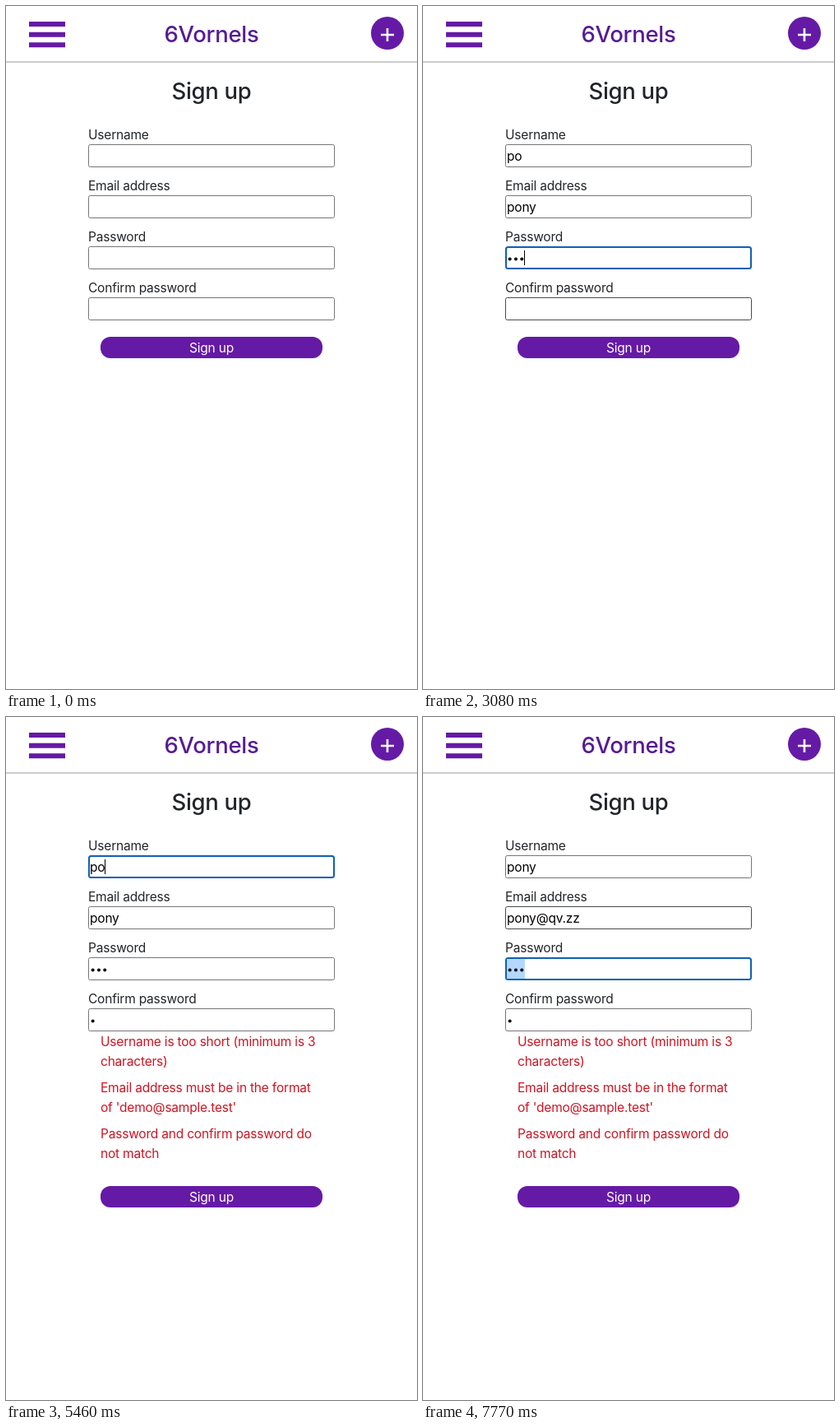
An HTML page for the animation above (8000 ms loop, 500x830 px).

```html
<!DOCTYPE html>
<html lang="en">
<head>
<meta charset="utf-8">
<title>Sign up</title>
<style>
  html, body { margin: 0; width: 100%; height: 100%; overflow: hidden; background: #fff; }
  svg { display: block; }
  text { font: 15.5px Inter, "Open Sans", sans-serif; letter-spacing: -0.2px; fill: #212529; }
  .heading { font-size: 27.5px; font-weight: 500; letter-spacing: -0.3px; text-anchor: middle; }
  .brand { fill: #561b94; }
  .value { fill: #000; }
  .error { fill: #cf1422; }
  .button { fill: #fff; text-anchor: middle; }
  .purple { fill: #651aa6; }
</style>
</head>
<body>
<svg id="stage" width="500" height="830" viewBox="0 0 500 830">
  <path class="purple" d="M28 19h44v6H28zM28 31.7h44v6H28zM28 44.3h44v6H28z"/>
  <text class="heading brand" x="250" y="44">6Vornels</text>
  <circle class="purple" cx="464" cy="33" r="20"/>
  <path d="M456 35h16M464 27v16" stroke="#fff" stroke-width="2.6"/>
  <rect y="67" width="500" height="2" fill="#ccc"/>
  <text class="heading" x="250" y="113">Sign up</text>
  <g id="fields"></g>
  <g id="errors"></g>
  <g id="submit">
    <rect class="purple" x="115" y="402" width="270" height="26" rx="12"/>
    <text class="button" x="250" y="421">Sign up</text>
  </g>
</svg>
<script>
const LOOP = 8000;
const LEFT = 102;
const DOT_PITCH = 7.3;
const [USER, EMAIL, PASS, CONFIRM] = [0, 1, 2, 3];
const NONE = -1;

const labels = ["Username", "Email address", "Password", "Confirm password"];
const errorLines = [
  [400, "Username is too short (minimum is 3"], [424, "characters)"],
  [456, "Email address must be in the format"], [480, "of 'demo@sample.test'"],
  [512, "Password and confirm password do"], [536, "not match"]
];

// Each step is merged into the state once its time is reached.
const steps = [
  [0, { hover: NONE, focus: NONE, errors: false, selected: false,
        user: "", email: "", pass: 0, confirm: 0 }],
  [420, { hover: USER }],
  [770, { focus: USER }],
  [1260, { user: "p" }],
  [1540, { user: "po" }],
  [1610, { focus: EMAIL }],
  [2170, { email: "pony" }],
  [2380, { focus: PASS }],
  [2520, { hover: EMAIL }],
  [2800, { hover: NONE }],
  [3080, { hover: CONFIRM, pass: 3 }],
  [3360, { focus: CONFIRM }],
  [3570, { confirm: 1 }],
  [3920, { focus: NONE, hover: NONE }],
  [3990, { errors: true }],
  [4830, { hover: CONFIRM }],
  [4900, { hover: PASS }],
  [4970, { hover: USER }],
  [5390, { focus: USER }],
  [5810, { user: "pon" }],
  [5950, { user: "pony" }],
  [6160, { focus: EMAIL, hover: NONE }],
  [6580, { email: "pony@" }],
  [6860, { email: "pony@q" }],
  [7000, { email: "pony@qv" }],
  [7210, { email: "pony@qv." }],
  [7350, { email: "pony@qv.z" }],
  [7490, { email: "pony@qv.zz" }],
  [7770, { focus: PASS, hover: EMAIL, selected: true }]
];

function add(parent, tag, attrs, content = "") {
  const node = document.createElementNS("http://www.w3.org/2000/svg", tag);
  setAttrs(node, attrs);
  node.textContent = content;
  return parent.appendChild(node);
}

function setAttrs(node, attrs) {
  for (const name in attrs) node.setAttribute(name, attrs[name]);
}

const byId = id => document.getElementById(id);
const show = (node, visible) => node.setAttribute("visibility", visible ? "visible" : "hidden");

const fields = labels.map((label, i) => {
  const top = 168 + 62 * i;
  const group = byId("fields");
  add(group, "text", { x: 100, y: top - 6 }, label);
  const field = {
    top,
    box: add(group, "rect", { fill: "#fff" }),
    mark: add(group, "rect", { x: LEFT, y: top + 2, width: 3 * DOT_PITCH, height: 24, fill: "#b3d7fe" }),
    text: add(group, "text", { class: "value", x: LEFT, y: top + 20 }),
    dots: [0, 1, 2].map(n =>
      add(group, "circle", { cx: LEFT + DOT_PITCH * (n + 0.5), cy: top + 15.5, r: 2 })),
    caret: add(group, "rect", { y: top + 5, width: 1, height: 18 })
  };
  return field;
});

errorLines.forEach(([y, line]) => add(byId("errors"), "text", { class: "error", x: 115, y }, line));

function drawField(field, value, focused, hovered, selected) {
  const weight = focused ? 2 : 1;
  setAttrs(field.box, {
    x: 100 + weight / 2, y: field.top + weight / 2,
    width: 300 - weight, height: 28 - weight, rx: focused ? 2.5 : 2,
    "stroke-width": weight,
    stroke: focused ? "#0f60b4" : hovered ? "#4a4a4a" : "#767676"
  });
  const masked = typeof value === "number";
  field.text.textContent = masked ? "" : value;
  field.dots.forEach((dot, n) => show(dot, masked && n < value));
  const length = masked ? value * DOT_PITCH : value ? field.text.getComputedTextLength() : 0;
  field.caret.setAttribute("x", Math.floor(LEFT + length));
  show(field.caret, focused && !selected);
  show(field.mark, focused && selected);
}

function render(time) {
  const state = Object.assign({}, ...steps.filter(([at]) => at <= time).map(([, change]) => change));
  [state.user, state.email, state.pass, state.confirm].forEach((value, i) =>
    drawField(fields[i], value, state.focus === i, state.hover === i, state.selected));
  show(byId("errors"), state.errors);
  byId("submit").setAttribute("transform", `translate(0 ${state.errors ? 168 : 0})`);
}

const start = performance.now();
function tick() {
  render((performance.now() - start) % LOOP);
  requestAnimationFrame(tick);
}
tick();
</script>
</body>
</html>
```
